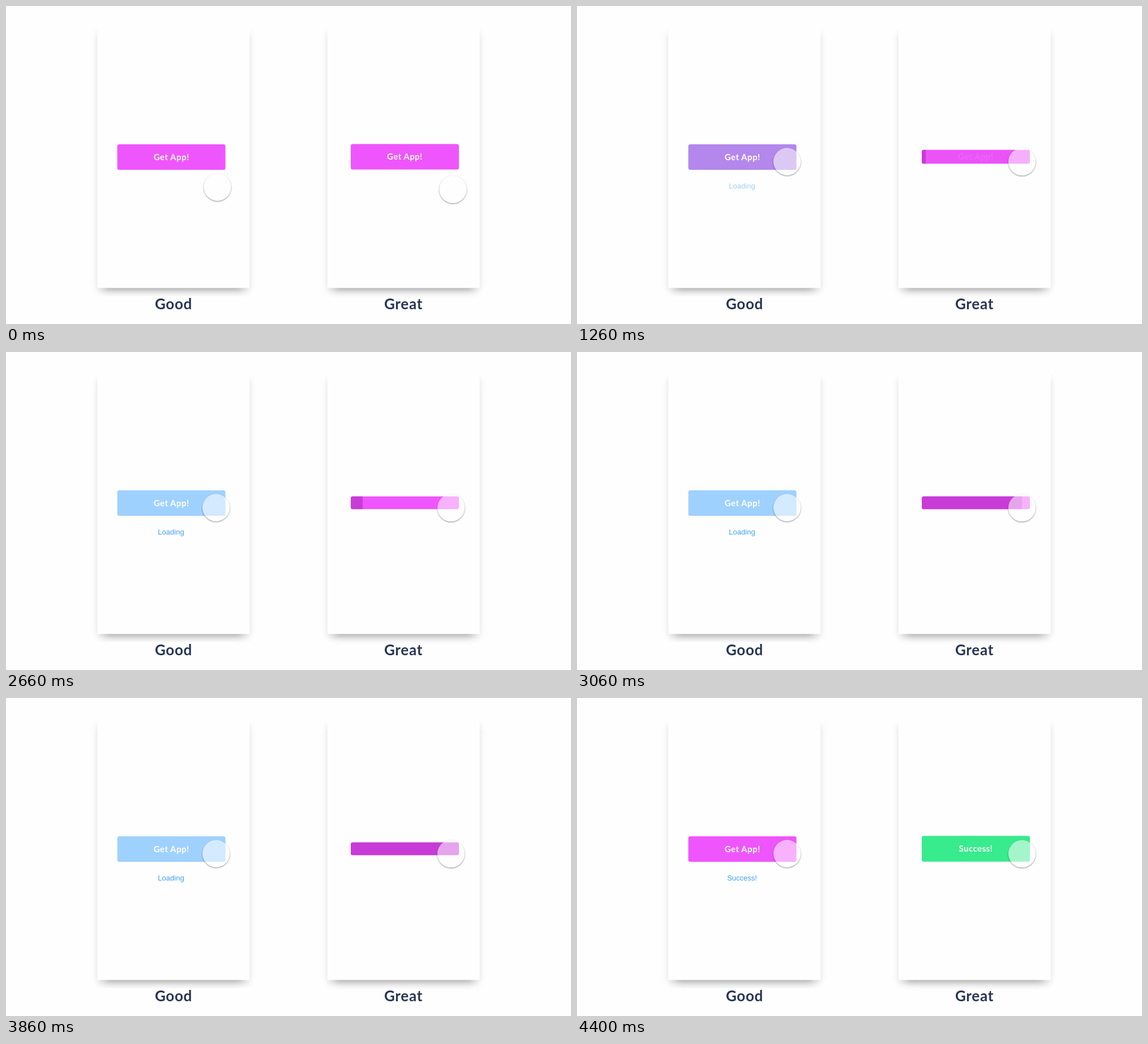
These frames come from a looping animation (998 px wide and 561 px high, 5.13 s). An HTML page:

```html
<!DOCTYPE html>
<html lang="en">
<head>
<meta charset="utf-8">
<title>Button feedback: good and great</title>
<style>
html, body { margin: 0; width: 100%; height: 100%; overflow: hidden; background: #fefefe; }
svg { display: block; width: 100vw; height: 100vh; }
text { text-anchor: middle; }
.label { font: 700 26px Lato, sans-serif; letter-spacing: .7px; fill: #263552; }
.btn { font: 700 15px Lato, sans-serif; letter-spacing: .45px; fill: #fff; }
.note { font: 13px "Liberation Sans", Arial, sans-serif; fill: #3fa0f2; }
</style>
</head>
<body>
<svg viewBox="0 0 998 561" preserveAspectRatio="none">
  <defs>
    <filter id="soft" filterUnits="userSpaceOnUse" x="-40" y="-10" width="360" height="580">
      <feGaussianBlur stdDeviation="5.5"/>
    </filter>
    <filter id="rim" x="-20%" y="-20%" width="140%" height="140%">
      <feGaussianBlur in="SourceAlpha" stdDeviation="1"/>
      <feOffset dy="1.2"/>
      <feComposite operator="out" in2="SourceAlpha"/>
      <feComponentTransfer><feFuncA type="linear" slope=".48"/></feComponentTransfer>
    </filter>
    <clipPath id="cutA"><rect x="-40" width="360" height="512"/></clipPath>
    <clipPath id="cutB"><rect x="-40" width="360" height="516"/></clipPath>
    <clipPath id="barClip"><rect id="barShape" x="609" width="191" rx="3.5"/></clipPath>
    <g id="shade">
      <rect y="44" width="269" height="462" rx="12" fill-opacity=".13" filter="url(#soft)"/>
      <rect x="14" y="460" width="241" height="40" rx="6" fill-opacity=".24" filter="url(#soft)"/>
    </g>
    <g id="cursor">
      <circle r="24.2" filter="url(#rim)"/>
      <circle r="24.2" fill="#fff" fill-opacity=".54"/>
    </g>
  </defs>
  <rect width="998" height="561" fill="#fefefe"/>
  <g transform="translate(161.3 0)" clip-path="url(#cutA)"><use href="#shade"/></g>
  <g transform="translate(567.7 0)" clip-path="url(#cutB)"><use href="#shade"/></g>
  <rect x="161.3" y="19" width="269" height="478.5" fill="#fefefe"/>
  <rect x="567.7" y="19" width="269" height="478.5" fill="#fefefe"/>
  <text class="label" x="296" y="535">Good</text>
  <text class="label" x="702" y="535">Great</text>

  <rect id="good" x="196.6" y="244" width="191" height="45" rx="3.5"/>
  <text class="btn" x="292.2" y="271.8">Get App!</text>
  <text class="note" id="loading" x="291.5" y="321.5">Loading</text>
  <text class="note" id="done" x="291.5" y="321.5">Success!</text>

  <g clip-path="url(#barClip)">
    <rect id="great" x="609" y="243" width="191" height="46"/>
    <rect id="fill" x="609" y="243" height="46"/>
  </g>
  <text class="btn" id="ask" x="704.4" y="271.3">Get App!</text>
  <text class="btn" id="yes" x="704.4">Success!</text>

  <use id="curA" href="#cursor"/>
  <use id="curB" href="#cursor"/>
</svg>
<script>
const LOOP = 5130, FPS = 15;
const PINK = [239, 85, 252], DARK = [199, 60, 214], BLUE = [159, 209, 255], GREEN = [56, 235, 141];

const $ = id => document.getElementById(id);
const set = (id, attrs) => { for (const k in attrs) $(id).setAttribute(k, attrs[k]); };
const lerp = (a, b, p) => a + (b - a) * p;
const mix = (a, b, p) => a.map((v, i) => lerp(v, b[i], p));
const rgb = c => `rgb(${c.map(Math.round)})`;
const span = (k, a, b) => Math.min(1, Math.max(0, (k - a) / (b - a)));
const inOut = (p, n) => p < .5 ? 2 ** (n - 1) * p ** n : 1 - (2 - 2 * p) ** n / 2;
const out = p => 1 - (1 - p) ** 4;
const moveTo = (id, x, y) => set(id, { transform: `translate(${x} ${y})` });

function draw(ms) {
  // Motion advances in steps of 1/15 s
  const k = Math.floor((ms + 7) * FPS / 1000);

  const tap = inOut(span(k, 1, 9), 3);
  moveTo('curA', lerp(373.5, 371, tap), lerp(319.5, 274.5, tap));
  moveTo('curB', lerp(789.5, 786, tap), lerp(323.7, 274.8, tap));

  const wait = inOut(span(k, 15, 23), 3);
  const shrink = out(span(k, 15, 24));
  const load = inOut(span(k, 35, 51), 4);
  const end = span(k, 59, 66);
  const grow = out(end);

  const pressed = mix(PINK, DARK, tap);
  set('good', { fill: rgb(mix(mix(pressed, BLUE, wait), PINK, end ** 3)) });
  set('loading', { opacity: wait * Math.min(1, 2 - 2 * end) });
  set('done', { opacity: Math.min(1, 2 * end) });

  const h = lerp(45, 22.6, shrink - grow);
  set('barShape', { y: 266 - h / 2, height: h });
  set('great', { fill: rgb(mix(mix(pressed, PINK, shrink), GREEN, grow)) });
  set('fill', {
    width: lerp(7, 191, load),
    fill: rgb(mix(DARK, GREEN, grow)),
    opacity: k < 15 ? 0 : 1
  });
  set('ask', { opacity: 1 - shrink });
  set('yes', { opacity: grow, y: 271.3 + 8 * (1 - grow) });
}

const start = performance.now();
function tick() {
  draw((performance.now() - start) % LOOP);
  requestAnimationFrame(tick);
}
draw(0);
requestAnimationFrame(tick);
</script>
</body>
</html>
```
